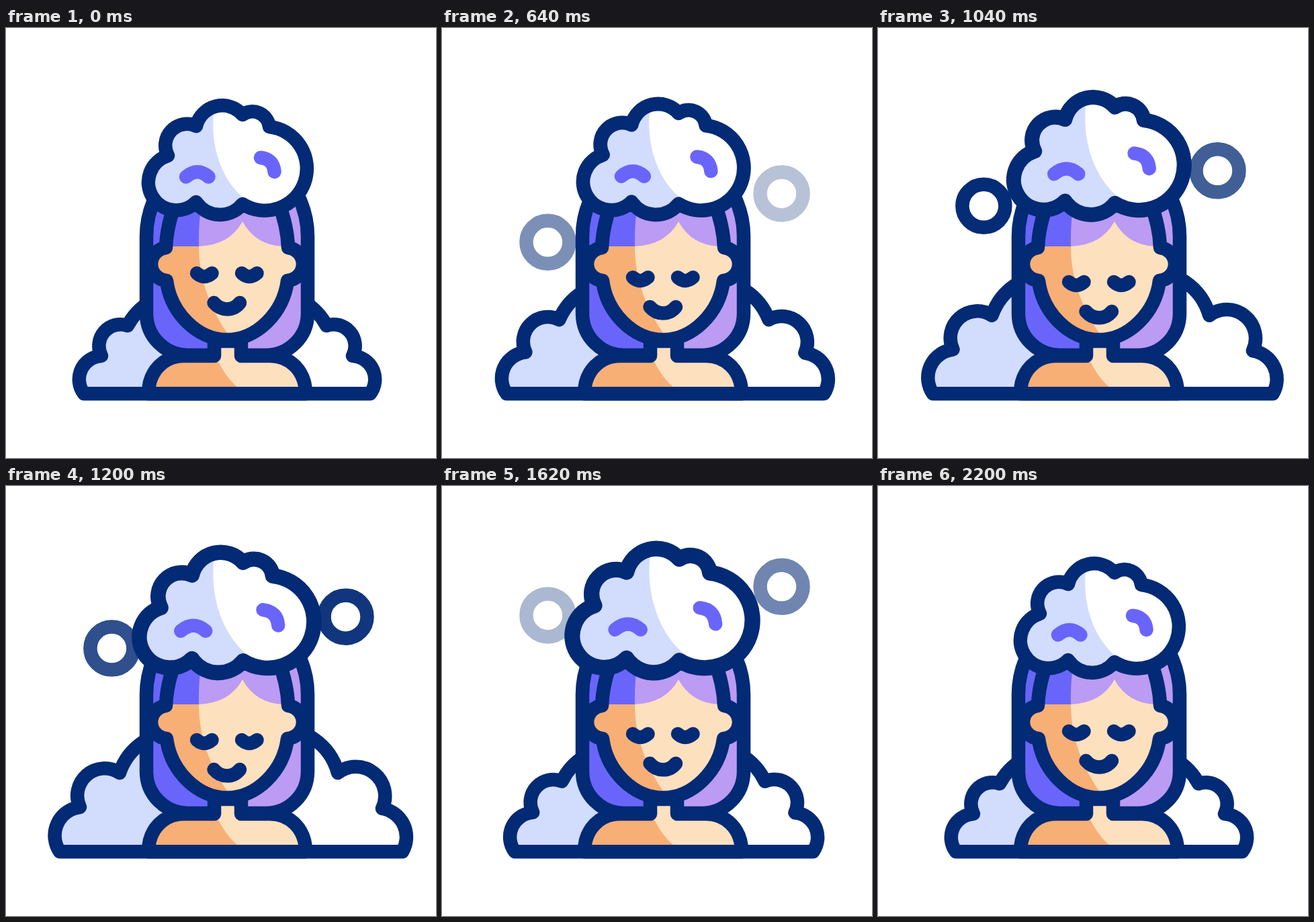
An HTML page for the animation above (2.42 s loop, 640 by 640 pixels).

```html
<!DOCTYPE html>
<html lang="en">
<head>
<meta charset="utf-8">
<title>Hair wash</title>
<style>
  html, body { margin: 0; height: 100%; overflow: hidden; background: #fff; }
  svg { display: block; width: 100vw; height: 100vh; }
  .line { fill: none; stroke: #032a75; stroke-width: 20.5; stroke-linecap: round; stroke-linejoin: round; vector-effect: non-scaling-stroke; }
  .shine { stroke: #6a65fa; }
  .blue { fill: #d2dcfd; }
  .white { fill: #fff; }
  .purple { fill: #6a65fa; }
  .lilac { fill: #bb9bf3; }
  .skin { fill: #fde0be; }
  .shade { fill: #f7af75; }
</style>
</head>
<body>
<svg viewBox="0 0 640 640">
  <defs>
    <linearGradient id="foamFill" gradientUnits="userSpaceOnUse" x1="0" x2="640" y1="0" y2="0">
      <stop offset=".514" stop-color="#d2dcfd"/><stop offset=".514" stop-color="#fff"/>
    </linearGradient>
    <linearGradient id="hairFill" gradientUnits="userSpaceOnUse" x1="0" x2="640" y1="0" y2="0">
      <stop offset=".514" stop-color="#6a65fa"/><stop offset=".514" stop-color="#bb9bf3"/>
    </linearGradient>
    <path id="body" d="M212 544.2C212 510 236 488 265 488H310V466H350V488H393C422 488 446 510 446 544.2Z"/>
    <path id="face" d="M253 258Q239 295 238 327A24.6 24.6 0 0 0 239 376C245 424 285 464 329 464C373 464 413 424 419 376A24.6 24.6 0 0 0 420 327Q419 295 405 258"/>
    <path id="cap" d="M241 190A32 32 0 0 1 283 146A40 40 0 0 1 352 129A25.5 25.5 0 0 1 392 147A62.5 62.5 0 1 1 352 262A43 43 0 0 1 283 259A41.6 41.6 0 1 1 241 190Z"/>
    <clipPath id="inBody"><use href="#body"/></clipPath>
    <clipPath id="inFace"><use href="#face"/></clipPath>
    <clipPath id="inCap"><use href="#cap"/></clipPath>
  </defs>

  <circle id="ringL" class="line" cx="157.4" r="32"/>
  <circle id="ringR" class="line" cx="505.5" r="32"/>
  <path id="foam" class="line" style="fill:url(#foamFill)"/>

  <path class="line" style="fill:url(#hairFill)" d="M224 248C214 268 209 288 209 310V425A62 62 0 0 0 271 487H387A62 62 0 0 0 449 425V310C449 288 444 268 434 248Z"/>

  <g clip-path="url(#inBody)">
    <path class="skin" d="M200 450H460V560H200Z"/>
    <path class="shade" d="M200 480H309Q322 516 346 536V550H200Z"/>
  </g>
  <use href="#body" class="line"/>

  <g clip-path="url(#inFace)">
    <path class="skin" d="M200 250H460V470H200Z"/>
    <path class="shade" d="M200 325H287C287 375 305 420 332 458V480H200Z"/>
    <path class="lilac" d="M230 250V325H287Q333 323 352 288Q371 323 412 325H430V250Z"/>
    <path class="purple" d="M230 250H293Q286 288 287 325H230Z"/>
  </g>
  <use href="#face" class="line"/>
  <path id="features" class="line" d="M284 365Q295 375 306.5 365M351 365Q362 375 373.5 365M309.5 409C320 421.500 338 421.500 348 409"/>

  <g id="head">
    <g clip-path="url(#inCap)">
      <path class="white" d="M190 90H470V290H190Z"/>
      <path id="capShade" class="blue" d="M180 90H314L311 115C302 160 314 225 360 258V290H180Z"/>
    </g>
    <use href="#cap" class="line"/>
    <path class="line shine" d="M268 221.500Q285 207 301.500 221.500M379 193Q398 195 399.500 214"/>
  </g>
</svg>
<script>
  const LOOP = 2420;
  const el = id => document.getElementById(id);
  const clamp = x => Math.min(1, Math.max(0, x));
  const mix = (a, b, k) => a + (b - a) * k;
  const span = (t, from, to) => clamp((t - from) / (to - from));
  const ease = x => x * x * (3 - 2 * x);
  const swell = (t, from, peak, to) =>
    t < peak ? ease(span(t, from, peak)) : 1 - ease(span(t, peak, to));

  // Foam arcs: [radius, x, y] at rest, then swollen
  const arcs = [
    [35, 142, 488, 42.5, 110, 478],
    [32, 181, 443, 40.5, 169, 427],
    [90, 260, 395, 90, 260, 366],
    null,
    [90, 477, 443, 90, 494, 427],
    [32, 516, 488, 43.5, 560, 480],
    [35, 542, 544.2, 43, 590, 544.2]
  ];

  function foamPath(k) {
    const steps = arcs.map(a => {
      if (!a) return `L398 ${mix(395, 361, k)}`;
      const [r, x, y] = [0, 1, 2].map(i => mix(a[i], a[i + 3], k));
      return `A${r} ${r} 0 0 1 ${x} ${y}`;
    });
    return `M${mix(116, 80, k)} 544.2${steps.join('')}Z`;
  }

  function moveRing(id, t, start, y, rise) {
    const x = span(t, start, start + 1700);
    el(id).setAttribute('cy', y - rise * ease(x));
    el(id).setAttribute('opacity', 1 - Math.abs(2 * x - 1));
  }

  function draw(now) {
    const t = now % LOOP;
    const headSwell = swell(t, 400, 1600, 2200);
    const scale = 1 + 0.137 * headSwell;
    el('foam').setAttribute('d', foamPath(swell(t, 0, 1200, 1800)));
    el('features').setAttribute('transform', `translate(0 ${13.3 * swell(t, 200, 1130, 1900)})`);
    el('head').setAttribute('transform', `translate(344 278) scale(${scale}) translate(-344 -278)`);
    el('capShade').setAttribute('transform', `translate(${4.5 * headSwell} 0)`);
    moveRing('ringL', t, 200, 346.5, 166);
    moveRing('ringR', t, 400, 253.4, 128.5);
  }

  const start = performance.now();
  function tick() {
    draw(performance.now() - start);
    requestAnimationFrame(tick);
  }
  tick();
</script>
</body>
</html>
```
